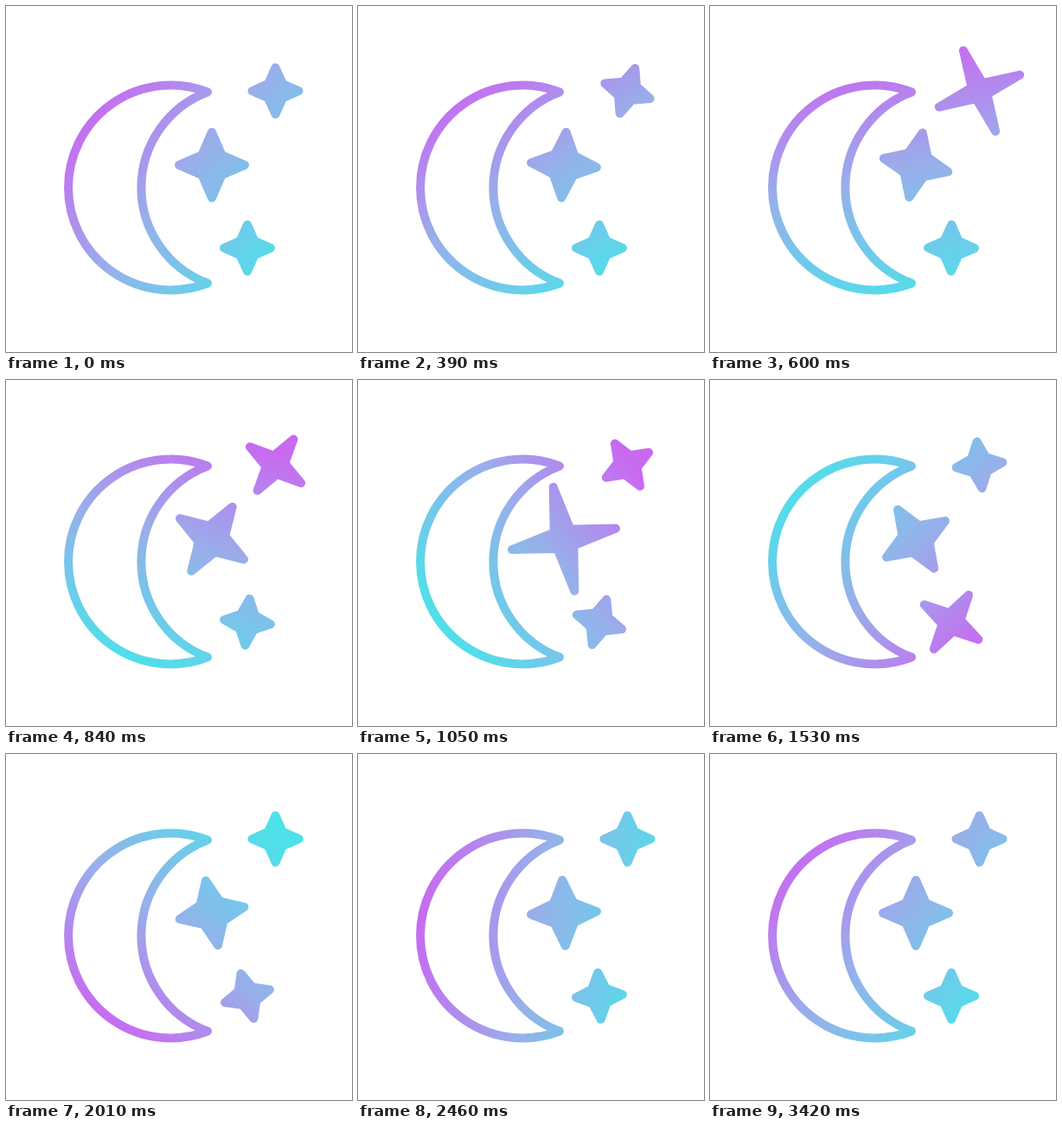
These frames come from a looping animation (400x400 px, 5.63 s). An HTML page:

```html
<!DOCTYPE html>
<html lang="en">
<head>
<meta charset="utf-8">
<title>Moon and stars</title>
<style>
  html, body { margin: 0; width: 100%; height: 100%; overflow: hidden; background: #fff; }
  svg { display: block; width: 100vw; height: 100vh; }
  path { stroke: url(#sky); stroke-width: 10; stroke-linejoin: round; fill: none; }
  .star { fill: url(#sky); }
</style>
</head>
<body>
<svg viewBox="0 0 400 400">
  <defs>
    <linearGradient id="sky" gradientUnits="userSpaceOnUse">
      <stop offset="0" stop-color="#c86af0"/>
      <stop offset=".47" stop-color="#97b0ea"/>
      <stop offset="1" stop-color="#4de1ea"/>
    </linearGradient>
  </defs>
  <path d="M233 99.5A118.4 118.4 0 1 0 233 320.5A118 118 0 0 1 233 99.5Z"/>
</svg>
<script>
const LOOP = 5630;
const TURN = 3000;
const svg = document.querySelector('svg');
const sky = document.getElementById('sky');

// Cubic Bezier easing, solved by bisection.
function bezier(x1, y1, x2, y2) {
  const at = (a, b, s) => 3 * a * s * (1 - s) ** 2 + 3 * b * s * s * (1 - s) + s ** 3;
  return x => {
    if (x <= 0) return 0;
    if (x >= 1) return 1;
    let lo = 0, hi = 1;
    for (let i = 0; i < 30; i++) {
      const mid = (lo + hi) / 2;
      if (at(x1, x2, mid) < x) lo = mid; else hi = mid;
    }
    return at(y1, y2, lo);
  };
}

const skyEase = bezier(.333, 0, .667, 1);
const slowEase = bezier(.58, 0, .06, 1);

const stars = [
  { x: 311.5, y: 98.2, tip: 27, notch: 8.3, start: 0, time: 2080, ease: bezier(.45, 0, .08, 1) },
  { x: 238, y: 183.8, tip: 38, notch: 11.5, start: 0, time: 3000, ease: slowEase },
  { x: 279, y: 279.8, tip: 27, notch: 8.3, start: 470, time: 2510, ease: slowEase }
];

for (const star of stars) {
  star.el = document.createElementNS('http://www.w3.org/2000/svg', 'path');
  star.el.setAttribute('class', 'star');
  svg.append(star.el);
}

// Stretch of the points over one turn: quick rise, slower fall.
function stretch(p) {
  const d = p - .4;
  const u = Math.min(1, Math.abs(d) / (d < 0 ? .33 : .52));
  return Math.cos(u * Math.PI / 2) ** 2;
}

function drawStar(star, t) {
  const p = star.ease((t - star.start) / star.time);
  const k = stretch(p);
  const tip = star.tip + 23.5 * k;
  const notch = star.notch * Math.SQRT2 * (1 - .17 * k);
  const points = [];
  for (let i = 0; i < 8; i++) {
    const r = i % 2 ? notch : tip;
    const a = p * Math.PI + i * Math.PI / 4;
    points.push((star.x + r * Math.sin(a)).toFixed(2) + ' ' + (star.y - r * Math.cos(a)).toFixed(2));
  }
  star.el.setAttribute('d', 'M' + points.join('L') + 'Z');
}

function drawSky(t) {
  const a = (220 + 360 * skyEase(t / TURN)) * Math.PI / 180;
  const dx = 146 * Math.cos(a), dy = 146 * Math.sin(a);
  const ends = { x1: 212 + dx, y1: 204 + dy, x2: 212 - dx, y2: 204 - dy };
  for (const name in ends) sky.setAttribute(name, ends[name].toFixed(2));
}

function draw() {
  const t = performance.now() % LOOP;
  drawSky(t);
  for (const star of stars) drawStar(star, t);
  requestAnimationFrame(draw);
}
draw();
</script>
</body>
</html>
```
